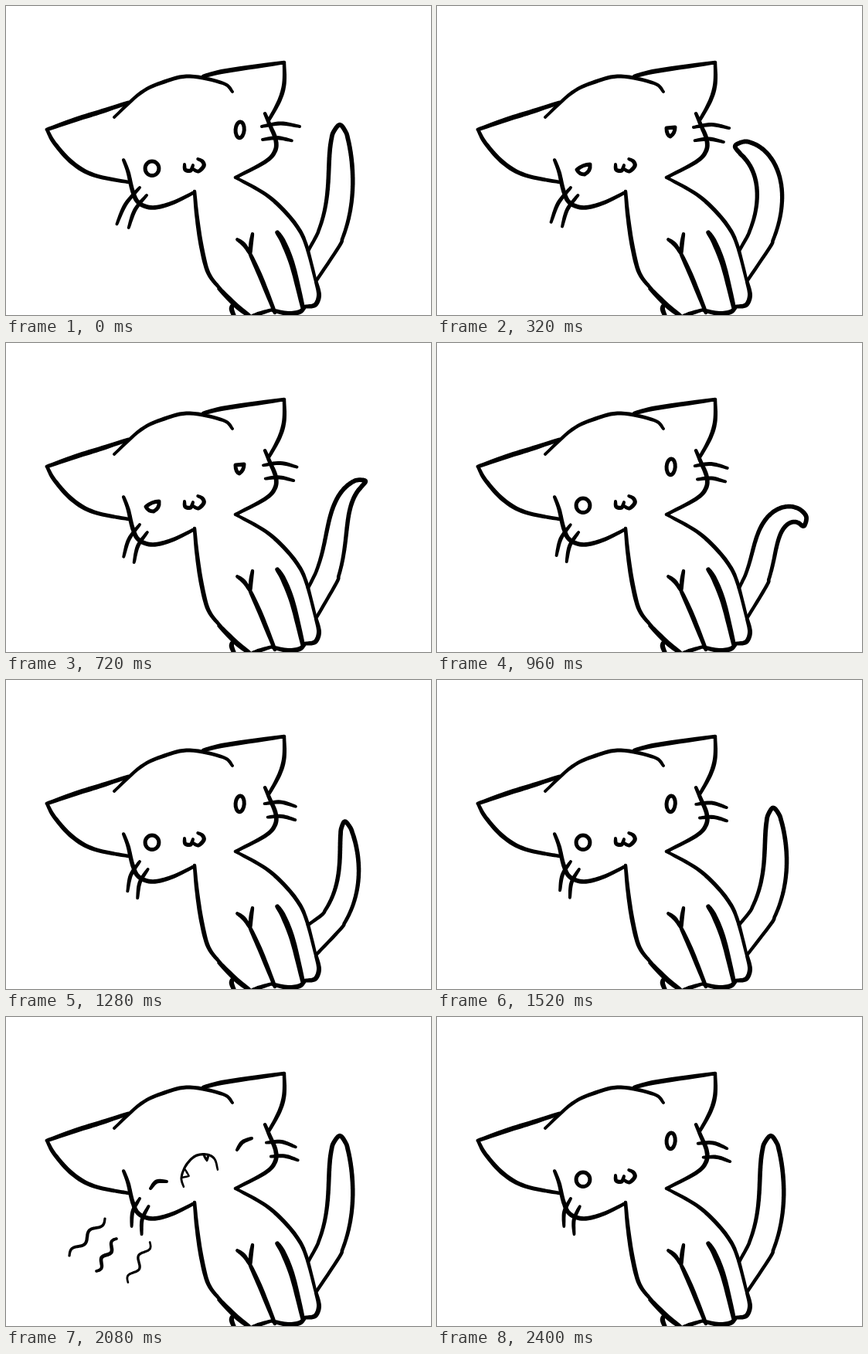
Recreate the animation shown at these times as an HTML page. Size 550 by 400 pixels, loop 2.48 s.

```html
<!DOCTYPE html>
<html lang="en">
<head>
<meta charset="utf-8">
<title>Cat</title>
<style>
  html, body { margin: 0; width: 100%; height: 100%; overflow: hidden; background: #fff; }
  svg { display: block; width: 100%; height: 100%; }
</style>
</head>
<body>
<svg viewBox="0 0 550 400">
  <path id="body"></path>
  <path id="tail"></path>
  <path id="whiskers"></path>
  <g id="open" fill="none" stroke="#000" stroke-width="5">
    <ellipse cx="189" cy="210.3" rx="8.9" ry="9.3"/>
    <ellipse cx="302.7" cy="160.3" rx="5.6" ry="10.4" transform="rotate(4 303 160)"/>
  </g>
  <g id="half" fill="none" stroke="#000" stroke-width="5" stroke-linejoin="round">
    <path d="M181 212Q189 205 198 205Q199 214 191 218Q184 218 181 212Z"/>
    <path d="M297 158L308 157Q308 165 302 169Q297 167 297 158Z"/>
  </g>
  <path id="closed"></path>
  <path id="squint"></path>
  <path id="mouth"></path>
  <path id="cry"></path>
  <path id="shake"></path>
</svg>
<script>
const LOOP = 2480, STEP = 80, RAD = Math.PI / 180;
const el = id => document.getElementById(id);
const mix = (a, b, k) => a + (b - a) * k;
const num = n => n.toFixed(1);

function spline(a, b, c, d, k) {
  return 0.5 * (2 * b + (c - a) * k + (2 * a - 5 * b + 4 * c - d) * k * k
    + (3 * b - a - 3 * c + d) * k * k * k);
}

// Smooth brush line through x,y pairs, fullest in the middle.
function ink(width, ...pts) {
  const last = pts.length / 2 - 1, sub = 8, n = last * sub;
  const at = (i, o) => pts[2 * Math.max(0, Math.min(last, i)) + o];
  const line = [];
  for (let s = 0; s <= n; s++) {
    const i = Math.min(last - 1, Math.floor(s / sub)), k = s / sub - i;
    const [x, y] = [0, 1].map(o => spline(at(i - 1, o), at(i, o), at(i + 1, o), at(i + 2, o), k));
    line.push({ x, y, r: width * (0.4 + 0.13 * Math.sin(Math.PI * s / n)) });
  }
  const left = [], right = [];
  line.forEach((p, s) => {
    const a = line[Math.max(0, s - 1)], b = line[Math.min(n, s + 1)];
    const len = Math.hypot(b.x - a.x, b.y - a.y) || 1;
    const nx = (a.y - b.y) / len * p.r, ny = (b.x - a.x) / len * p.r;
    left.push(num(p.x + nx) + " " + num(p.y + ny));
    right.unshift(num(p.x - nx) + " " + num(p.y - ny));
  });
  const cap = (p, to) => `A${num(p.r)} ${num(p.r)} 0 0 0 ${to}`;
  return "M" + left.join("L") + cap(line[n], right[0])
    + "L" + right.join("L") + cap(line[0], left[0]) + "Z";
}

const draw = (id, ...strokes) => el(id).setAttribute("d", strokes.join(""));

// A squiggle of two sine waves between two ends.
function wiggle(width, x1, y1, x2, y2, amp) {
  const len = Math.hypot(x2 - x1, y2 - y1), pts = [];
  for (let i = 0; i <= 16; i++) {
    const k = i / 16, off = amp * Math.sin(4 * Math.PI * k) / len;
    pts.push(mix(x1, x2, k) + (y2 - y1) * off, mix(y1, y2, k) - (x2 - x1) * off);
  }
  return ink(width, ...pts);
}

draw("body",
  // ears and crown
  ink(6, 158,125, 125,136, 90,147, 53,160),
  ink(5.5, 53,160, 63,178, 86,203, 114,219, 158,228),
  ink(4.8, 140,144, 175,112, 205,98, 238,91, 281,100, 293,111),
  ink(5.8, 255,91, 285,84, 360,73),
  ink(5.3, 360,73, 360,100, 354,122, 340,148),
  // cheeks
  ink(5.5, 335,139, 341,153, 349,173, 348,188, 335,202, 297,222),
  ink(5.5, 152,199, 158,215, 164,240, 172,255, 190,261, 215,255, 244,241),
  // chest and back
  ink(5.5, 244,240, 247,272, 253,312, 262,346, 278,367),
  ink(6.5, 276,366, 298,388, 315,401),
  ink(5, 297,222, 330,240, 352,257, 375,283, 388,308, 401,357),
  ink(5.8, 401,356, 405,374, 400,387, 387,389),
  // legs and feet
  ink(5.3, 299,302, 308,309, 316,321),
  ink(5.3, 319,295, 317,308, 316,322),
  ink(6, 316,321, 330,352, 348,397),
  ink(7.2, 351,293, 359,306, 371,337, 384,390),
  ink(6, 293,387, 292,393, 296,403),
  ink(5, 317,402, 328,398, 345,393),
  ink(6, 345,394, 365,398, 380,396, 387,389)
);

draw("closed",
  ink(5, 183,217, 189,222, 196,219, 198,211),
  ink(5, 296,169, 302,172, 308,168, 309,160));
draw("squint",
  ink(5, 187,222, 195,213, 208,213),
  ink(5, 299,172, 306,162, 318,157));
draw("mouth",
  ink(5, 231,205, 232,212, 239,213, 242,206),
  ink(5, 242,211, 249,214, 256,207, 254,201, 248,198));
draw("cry",
  ink(3.2, 230,220, 227,208, 233,192, 245,180, 260,178, 270,184, 274,198),
  ink(2.4, 231,196, 237,206),
  ink(2.4, 237,206, 227,208),
  ink(3, 256,179, 260,186),
  ink(3, 260,186, 262,179));
draw("shake",
  wiggle(4, 82,309, 128,261, 4),
  wiggle(4.6, 117,329, 143,287, -3.5),
  wiggle(3.2, 158,344, 186,291, 4.5));

// The tail's heading runs from lean, straightens by bend, and curls at the tip.
const pose = (at, len, lean, bend, curl, tip) => ({ at, len, lean, bend, curl, tip });
const poses = [
  pose(0, 191, 38, -65, 29, 17),
  pose(320, 185, 38, -60, -60, 17),
  pose(480, 217, 34, -60, 29, 9),
  pose(560, 190, 34, -60, 29, 9),
  pose(960, 162, 36, -70, 210, 13),
  pose(1280, 169, 55, -88, 25, 12),
  pose(1680, 191, 38, -65, 29, 17)
];

function tailPose(t) {
  const i = poses.findIndex(p => p.at > t);
  if (i < 0) return poses[poses.length - 1];
  const a = poses[i - 1], b = poses[i], k = (t - a.at) / (b.at - a.at), p = {};
  for (const key in a) p[key] = mix(a[key], b[key], k);
  return p;
}

function tail(t) {
  const p = tailPose(t), n = 40, left = [391, 317], right = [402, 355];
  let x = 397, y = 337;
  for (let i = 1; i <= n; i++) {
    const s = i / n, h = (p.lean + p.bend * s + p.curl * s ** 4) * RAD;
    x += Math.sin(h) * p.len / n;
    y -= Math.cos(h) * p.len / n;
    if (s < 0.2 || i % 2) continue;
    const w = mix(16, p.tip, s) * Math.sqrt(1 - s ** 5);
    left.push(x - Math.cos(h) * w, y - Math.sin(h) * w);
    if (i < n) right.unshift(x + Math.cos(h) * w, y + Math.sin(h) * w);
  }
  return ink(5.5, ...left, ...right);
}

// A bowed hair; its angle is in degrees clockwise from pointing right.
function whisker(x, y, angle, len, bow) {
  const c = Math.cos(angle * RAD), s = Math.sin(angle * RAD);
  return ink(4.8, x, y, x + c * len / 2 + s * bow, y + s * len / 2 - c * bow,
    x + c * len, y + s * len);
}

function eyesAt(t) {
  if (t >= 1760 && t < 2240) return "squint";
  if (t >= 480 && t < 720) return "closed";
  if (t >= 320 && t < 800) return "half";
  return "open";
}

const show = (id, on) => el(id).setAttribute("visibility", on ? "visible" : "hidden");

function render(time) {
  const t = Math.floor(time % LOOP / STEP) * STEP, k = t / LOOP;
  const eyes = eyesAt(t), crying = eyes === "squint";
  ["open", "half", "closed", "squint"].forEach(id => show(id, id === eyes));
  show("mouth", !crying);
  show("cry", crying);
  show("shake", crying);
  const jolt = t / STEP % 2;
  el("shake").setAttribute("transform", `translate(${jolt * 2} ${jolt * 5})`);

  draw("tail", tail(t));
  // whiskers droop and shorten over the loop
  const reach = (1 - k) ** 2;
  draw("whiskers",
    whisker(173, 235, mix(122, 103, k), 37 + 19 * reach, -4),
    whisker(mix(182, 185, k), 245, mix(119, 101, k), 37 + 11 * reach, -4),
    whisker(mix(331, 338, k), mix(156, 164, k), mix(0, 10, k), 38 + 11 * reach, 4),
    whisker(mix(332, 345, k), mix(173, 182, k), mix(2, 9, k), 35 + 3 * reach, 3));
}

let start;
function tick(now) {
  if (start === undefined) start = now;
  render(Math.max(0, now - start));
  requestAnimationFrame(tick);
}
render(0);
requestAnimationFrame(tick);
</script>
</body>
</html>
```
